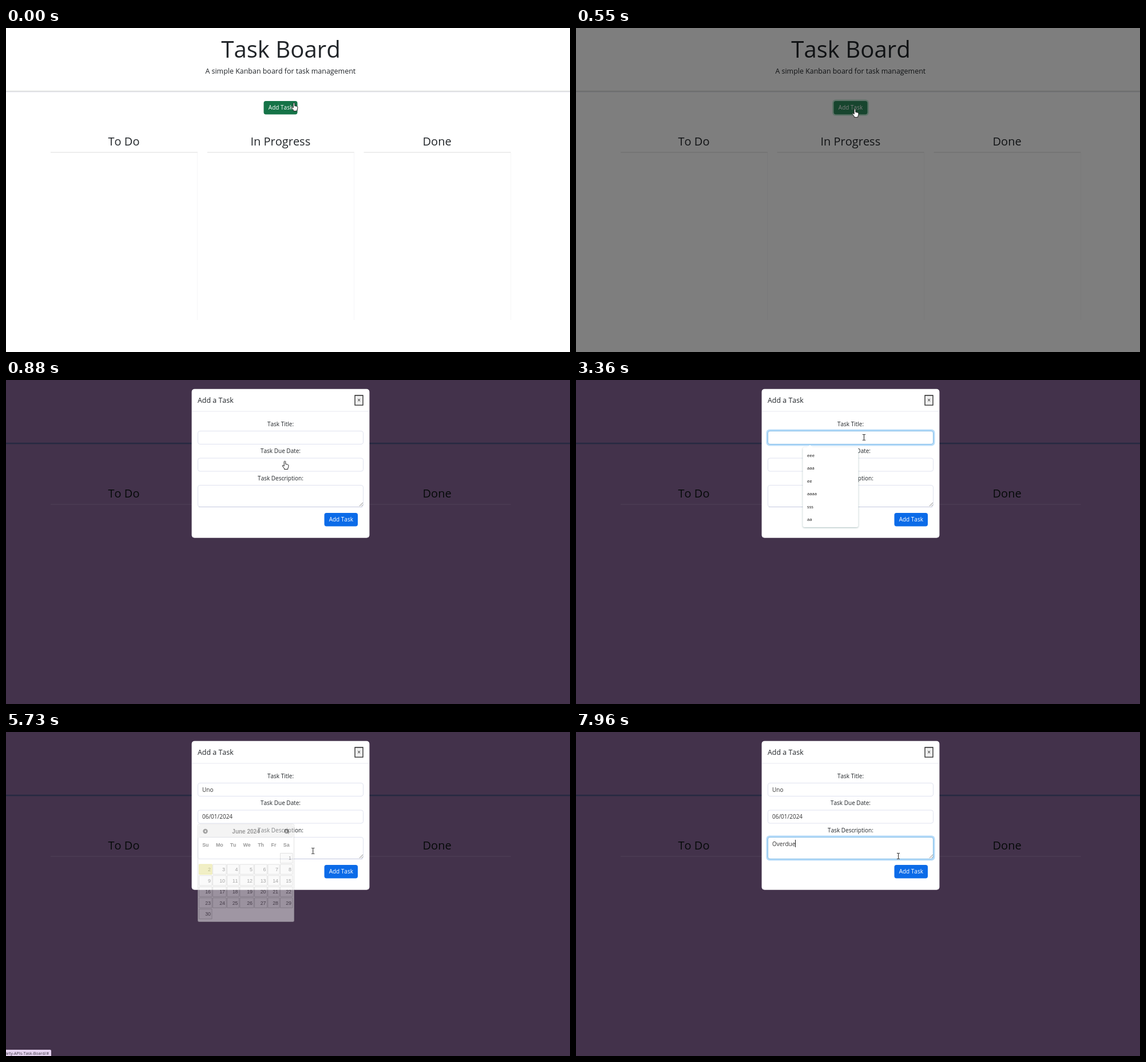
Write an HTML page with a canvas that moves like this. It is 986x568 px and loops after 7990 ms.

```html
<!DOCTYPE html>
<html lang="en">
<head>
<meta charset="utf-8">
<title>Task Board</title>
<style>
html, body { margin: 0; width: 100%; height: 100%; overflow: hidden; background: #fff; }
canvas { display: block; width: 986px; height: 568px; }
</style>
</head>
<body>
<canvas id="stage" width="986" height="568"></canvas>
<script>
const LOOP = 7990;
const SANS = '"Open Sans", sans-serif';
const ARIAL = '"Liberation Sans", Arial, sans-serif';

function context(canvas) {
  const c = canvas.getContext('2d');
  c.fontKerning = 'none';
  return c;
}
const stage = document.getElementById('stage');
const screenCtx = context(stage);
const layerCtx = context(stage.cloneNode());
let ctx = screenCtx;
let t = 0;

const LIGHT = { bg: '#fff', ink: '#212529', rule: '#d8dad6', ruleLow: '#dde0ec', line: '#dcdcdc',
  side: '#f6f6f7', button: '#157347', pressed: '#349364', label: '#fff', ring: '#b4e6cd' };
const DARK = { bg: '#43324b', ink: '#050a08', rule: '#20283f', ruleLow: '#282a42', line: '#514059',
  side: '#43324b', button: '#06260f', pressed: '#06260f', label: '#55605a', ring: '#243c42' };

// Cursor path: time, x, y
const PATH = [[0, 503.5, 131], [270, 487.5, 142], [2540, 487.5, 142], [2830, 503.5, 100.5],
  [5210, 503.5, 100.5], [5480, 490, 219], [5630, 490, 219], [5730, 536.5, 208.5],
  [5840, 560, 212], [7800, 560, 212], [7960, 563.5, 217.5], [LOOP, 563.5, 217.5]];

const ramp = (from, to) => Math.min(1, Math.max(0, (t - from) / (to - from)));
const swing = p => (1 - Math.cos(Math.PI * p)) / 2;
const during = (from, to) => t >= from && t < to;
const typed = (str, times) => str.slice(0, times.filter(at => t >= at).length);

function text(str, x, middle, size, color, align = 'center', family = SANS, weight = 400) {
  ctx.font = `${weight} ${size}px ${family}`;
  ctx.textAlign = align;
  ctx.fillStyle = color;
  ctx.fillText(str, x, middle + size * 0.357);
}

function rect(x, y, w, h, color) {
  ctx.fillStyle = color;
  ctx.fillRect(x, y, w, h);
}

function box(x, y, w, h, r, fill, stroke, width = 1) {
  ctx.beginPath();
  ctx.roundRect(x, y, w, h, r);
  if (fill) { ctx.fillStyle = fill; ctx.fill(); }
  if (stroke) { ctx.strokeStyle = stroke; ctx.lineWidth = width; ctx.stroke(); }
}

// Draws a group on its own layer so that its parts fade as one
function faded(alpha, draw) {
  if (alpha <= 0) return;
  layerCtx.clearRect(0, 0, 986, 568);
  ctx = alpha < 1 ? layerCtx : screenCtx;
  ctx.save();
  draw();
  ctx.restore();
  ctx = screenCtx;
  if (alpha >= 1) return;
  ctx.globalAlpha = alpha;
  ctx.drawImage(layerCtx.canvas, 0, 0);
  ctx.globalAlpha = 1;
}

function page(c) {
  rect(0, 0, 986, 568, c.bg);
  text('Task Board', 480.5, 37.5, 40.1, c.ink);
  text('A simple Kanban board for task management', 479.8, 75.6, 12.45, c.ink);
  rect(0, 110, 986, 1.5, c.rule);
  rect(0, 111.5, 986, 1, c.ruleLow);
  box(450.5, 128, 59, 23.5, 3.7, c.button);
  faded(ramp(430, 580), () => {
    box(448, 125.5, 64, 28.5, 6, c.ring);
    box(450.5, 128, 59, 23.5, 3.7, c.pressed);
  });
  text('Add Task', 480, 139.5, 10, c.label);
  ['To Do', 'In Progress', 'Done'].forEach((name, i) => {
    const x = 78 + i * 273.8;
    text(name, x + 128, 199, 20, c.ink);
    rect(x, 217.5, 257, 1, c.line);
    rect(Math.round(x + 256), 219, 1, 293, c.side);
  });
}

function field(label, y, h, focus, value, showCaret) {
  text(label, 480, y - 12, 10, '#212529');
  const frame = (fill, stroke) => box(335.5, y + 0.5, 289, h - 1, 3.5, fill, stroke);
  frame('#fff', '#dfe2ef');
  faded(focus, () => {
    box(332.5, y - 2.5, 295, h + 5, 6, '#b7dcf9');
    frame('#fff', '#80bce8');
  });
  text(value, 343, y + 12, 10, '#333', 'left');
  if (showCaret) rect(Math.round(343 + ctx.measureText(value).width), y + 5, 1, 13, '#222');
}

function modal() {
  box(324.6, 15.8, 310.8, 261, 5, '#fff');
  text('Add a Task', 335, 35.5, 12.45, '#212529', 'left');
  box(610, 27, 14, 17.2, 0, '#efefef', '#222', 1.3);
  text('×', 617, 35.5, 10, '#222');
  rect(325, 54.5, 310, 1, '#e8eaf1');

  const toDate = ramp(4270, 4420);
  field('Task Title:', 89, 24, ramp(2860, 3000) - toDate,
    typed('Uno', [3420, 3510, 3710]), during(2860, 3360) || during(3390, 4270));
  field('Task Due Date:', 136.5, 24, toDate - ramp(5540, 5690), t >= 5630 ? '06/01/2024' : '');
  const focus = ramp(5850, 6000);
  field('Task Description:', 184, 39, focus,
    typed('Overdue', [6380, 6510, 6740, 6810, 6870, 7030, 7750]), during(6030, 7490) || t >= 7750);
  if (focus < 1) rect(337, 222, 286, 1, '#c4c8de');
  ctx.strokeStyle = '#666';
  ctx.lineWidth = 0.8;
  ctx.beginPath();
  ctx.moveTo(618, 221); ctx.lineTo(624, 215);
  ctx.moveTo(621.5, 221); ctx.lineTo(624, 218.5);
  ctx.stroke();

  box(556.5, 233, 58.5, 23.5, 3.7, '#0b6be8');
  text('Add Task', 585.8, 244.8, 10, '#fff');
}

function suggestions() {
  ctx.save();
  ctx.shadowColor = 'rgba(40,90,90,.4)';
  ctx.shadowBlur = 3;
  ctx.shadowOffsetY = 1;
  box(396.5, 118, 97, 140, 3, '#fff');
  ctx.restore();
  ctx.fillStyle = '#fff';
  ctx.beginPath();
  ctx.moveTo(403, 119); ctx.lineTo(409, 114); ctx.lineTo(415, 119);
  ctx.fill();
  ['eee', 'aaa', 'ee', 'aaaa', 'sss', 'aa'].forEach((word, i) =>
    text(word, 404, 132.3 + i * 22.4, 7.7, '#111', 'left', SANS, 500));
}

function calendar() {
  box(335.5, 161.5, 168, 171, 2, '#fff', '#c5c5c5');
  box(337.5, 163.5, 164, 21, 2, '#e9e9e9', '#ddd');
  text('June 2024', 419.5, 174, 10, '#333', 'center', ARIAL, 700);
  [[348.5, -1], [490.5, 1]].forEach(([x, dir]) => {
    box(x - 4.2, 169.8, 8.4, 8.4, 4.2, '#444');
    ctx.fillStyle = '#fff';
    ctx.beginPath();
    ctx.moveTo(x - dir, 171.8); ctx.lineTo(x + dir * 1.6, 174); ctx.lineTo(x - dir, 176.2);
    ctx.fill();
  });
  const edges = [337.5, 361.5, 386.5, 409, 434.5, 458, 479.5, 502.5];
  ['Su', 'Mo', 'Tu', 'We', 'Th', 'Fr', 'Sa'].forEach((day, i) =>
    text(day, (edges[i] + edges[i + 1]) / 2 - 0.7, 198, 8.9, '#333', 'center', ARIAL, 700));
  for (let day = 1; day <= 30; day++) {
    const slot = day + 5, col = slot % 7, x = edges[col];
    const y = 212.5 + Math.floor(slot / 7) * 19.55, w = edges[col + 1] - x - 1.5;
    const today = day === 2, hover = day === 1 && during(5420, 5660);
    box(x, y, w, 17.5, 0, today ? '#e4e08a' : hover ? '#ededed' : '#f6f6f6', today ? '#dad55e' : '#c5c5c5');
    text(day, x + w - 2, y + 8.8, 8.9, today ? '#777620' : '#454545', 'right', ARIAL);
  }
}

function statusBar() {
  box(-4, 557, 83, 15, 2, '#e5d3f0');
  text('arty-APIs-Task-Board/#', 75, 563.6, 7.1, '#3a3340', 'right');
}

const HAND = new Path2D('M-1.3 1Q0-.8 1.3 1V5.4L5 6.2Q6.6 6.6 6.5 8.3Q6.5 11 5.2 13V14.6H-1V13L-4.2 8.9Q-4.3 7-2.6 7.8L-1.3 9Z');
const BEAM = new Path2D('M-2.5-5H-.5M.5-5H2.5M0-5V5M-2.5 5H-.5M.5 5H2.5');

function cursor() {
  const i = PATH.findIndex(point => t < point[0]);
  const [t0, x0, y0] = PATH[i - 1], [t1, x1, y1] = PATH[i];
  const p = ramp(t0, t1);
  ctx.save();
  ctx.translate(x0 + (x1 - x0) * p, y0 + (y1 - y0) * p);
  ctx.lineWidth = 1;
  ctx.strokeStyle = '#222';
  if (t < 2540 || during(5420, 5660)) {
    ctx.fillStyle = '#fff';
    ctx.fill(HAND);
    ctx.stroke(HAND);
  } else {
    ctx.stroke(BEAM);
  }
  ctx.restore();
}

function draw(now) {
  t = now % LOOP;
  page(t < 610 ? LIGHT : DARK);
  if (t < 610) rect(0, 0, 986, 568, `rgba(0,0,0,${1 - (1 - ramp(461, 612) / 2) ** 2})`);
  faded(ramp(610, 760), () => {
    ctx.translate(0, -31 * (1 - ramp(610, 880)) ** 2);
    modal();
  });
  if (during(2980, 3420)) suggestions();
  faded(swing(ramp(4250, 4480)) - swing(ramp(5630, 5830)), calendar);
  faded(ramp(5400, 5480) - ramp(6020, 6180), statusBar);
  cursor();
  requestAnimationFrame(draw);
}
requestAnimationFrame(draw);
</script>
</body>
</html>
```
